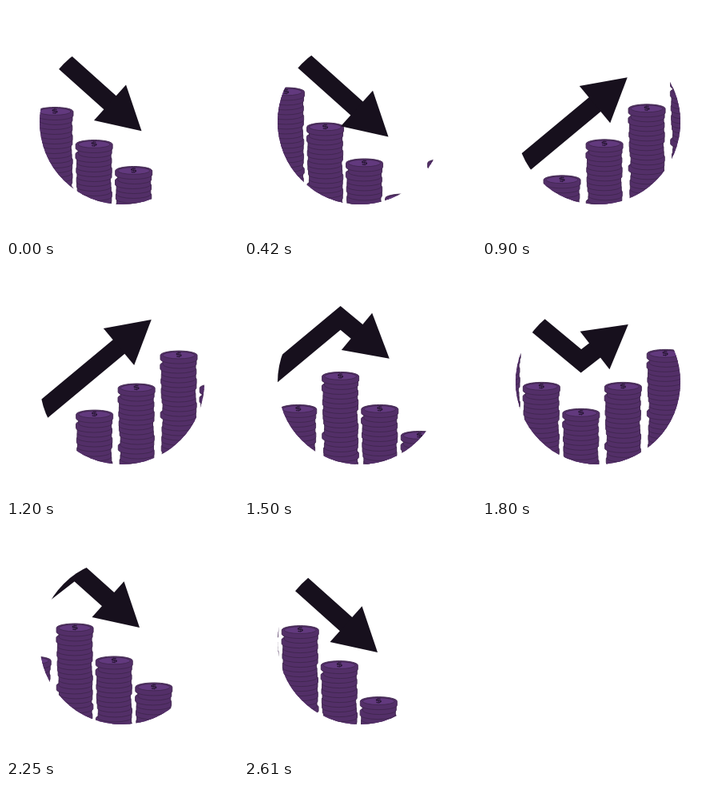
An HTML page with a canvas for the animation above (2.64 s loop, 290 by 290 pixels).

```html
<!DOCTYPE html>
<html lang="en">
<head>
<meta charset="utf-8">
<title>Coin stacks and trend arrow</title>
<style>
  html, body { margin: 0; width: 100%; height: 100%; overflow: hidden; background: #fff; }
  canvas { display: block; width: 290px; height: 290px; }
</style>
</head>
<body>
<canvas id="stage" width="290" height="290"></canvas>
<script>
const ctx = document.getElementById('stage').getContext('2d');
const LOOP = 2640, STEP = 30;
const INK = '#17101d', COIN = '#532f68', FACE = '#62397e', EDGE = '#40264f', MARK = '#23142e';

// Stack heights by steps away from a peak; the zigzag repeats every 14 stacks
const levels = [-73, -32, 1, 45, 90, 134];
const PERIOD = 14, GAP = 51;

function stackAt(i) {
  const p = (i + 2 + 2 * PERIOD) % PERIOD;
  const y = levels[Math.min(p, Math.abs(p - 4), PERIOD - p)];
  return [GAP * i - 0.045 * (y - levels[0]), y];
}

// Corners of the trend line, above the peaks and valleys of the stacks
const PEAK = -146, DIP = -64, VALLEY = 74;
const trend = [[-14, DIP], [-12, PEAK], [-7, VALLEY], [-2, PEAK], [0, DIP], [2, PEAK], [7, VALLEY]]
  .map(([i, y]) => [stackAt(i)[0], y]);

function trendY(x) {
  let i = 0;
  while (i < trend.length - 2 && x >= trend[i + 1][0]) i++;
  const [x0, y0] = trend[i], [x1, y1] = trend[i + 1];
  return y0 + (y1 - y0) * (x - x0) / (x1 - x0);
}

function smoothTrendY(x) {
  let sum = 0;
  for (let d = -30; d <= 30; d += 10) sum += trendY(x + d);
  return sum / 7;
}

function ease(t, from, to) {
  const u = Math.min(Math.max((t - from) / (to - from), 0), 1);
  return u * u * (3 - 2 * u);
}

// Steady pan that starts from rest; the height follows the trend, less so near peaks
function pose(t) {
  const settle = Math.exp(-t / 83);
  const camX = 699.6 - 0.318 * t - 26.6 * settle;
  const headX = 130 + 11 * ease(t, 0, 420) - 13.5 * ease(t, 1800, 2250) - camX;
  const y = smoothTrendY(headX);
  const camY = 124 - 0.8 * y - 0.0009 * y * y + 20 * settle;
  return { camX, camY, headX };
}

// Repeatable noise between -1 and 1
function noise(n) {
  const s = Math.sin(n * 12.9898) * 43758.5453;
  return 2 * (s - Math.floor(s)) - 1;
}

function dollar(x, y) {
  ctx.save();
  ctx.translate(x, y);
  ctx.rotate(-0.2);
  ctx.scale(1.3, 0.85);
  ctx.fillStyle = MARK;
  ctx.fillText('$', 0, 0);
  ctx.restore();
}

function coin(x, y, rx) {
  const ry = 5.5, thick = 5;
  ctx.beginPath();
  ctx.ellipse(x, y, rx, ry, 0, Math.PI, 0);
  ctx.ellipse(x, y + thick, rx, ry, 0, 0, Math.PI);
  ctx.closePath();
  ctx.fillStyle = COIN;
  ctx.fill();
  ctx.stroke();
}

function stack(x, y) {
  const pitch = 6;
  ctx.strokeStyle = EDGE;
  ctx.lineWidth = 0.9;
  for (let i = Math.ceil((252 - y) / pitch); i > 0; i--) {
    coin(x + 1.2 * noise(i), y + i * pitch, 21.6 + 0.8 * noise(i + 50));
  }
  coin(x, y, 23);
  ctx.beginPath();
  ctx.ellipse(x, y, 20, 4.4, 0, 0, 7);
  ctx.fillStyle = FACE;
  ctx.fill();
  ctx.stroke();
  dollar(x, y);
}

function arrow(x) {
  const y = trendY(x), turn = 14;
  const angle = Math.atan2(trendY(x + turn) - trendY(x - turn), 2 * turn);
  ctx.beginPath();
  for (const [px, py] of trend) if (px < x) ctx.lineTo(px, py);
  ctx.lineTo(x, y);
  ctx.lineTo(x + 4 * Math.cos(angle), y + 4 * Math.sin(angle));
  ctx.strokeStyle = ctx.fillStyle = INK;
  ctx.lineWidth = 23;
  ctx.stroke();
  ctx.translate(x, y);
  ctx.rotate(angle);
  ctx.beginPath();
  ctx.moveTo(0, -30);
  ctx.lineTo(53, 0);
  ctx.lineTo(0, 30);
  ctx.fill();
}

function draw(t) {
  const { camX, camY, headX } = pose(t);
  ctx.fillStyle = '#fff';
  ctx.fillRect(0, 0, 290, 290);
  ctx.save();
  ctx.beginPath();
  ctx.arc(145, 145, 103, 0, 7);
  ctx.clip();
  ctx.font = 'bold 10px "Liberation Sans", sans-serif';
  ctx.textAlign = 'center';
  ctx.textBaseline = 'middle';
  ctx.translate(camX, camY);
  const first = Math.floor((15 - camX) / GAP);
  for (let i = first; i < first + 7; i++) {
    const [x, y] = stackAt(i);
    ctx.save();
    ctx.translate(0, -camY);
    stack(x, y + camY);
    ctx.restore();
  }
  arrow(headX);
  ctx.restore();
}

const start = performance.now();
function tick() {
  const t = (performance.now() - start) % LOOP;
  draw(Math.floor(t / STEP) * STEP);
  requestAnimationFrame(tick);
}
tick();
</script>
</body>
</html>
```
